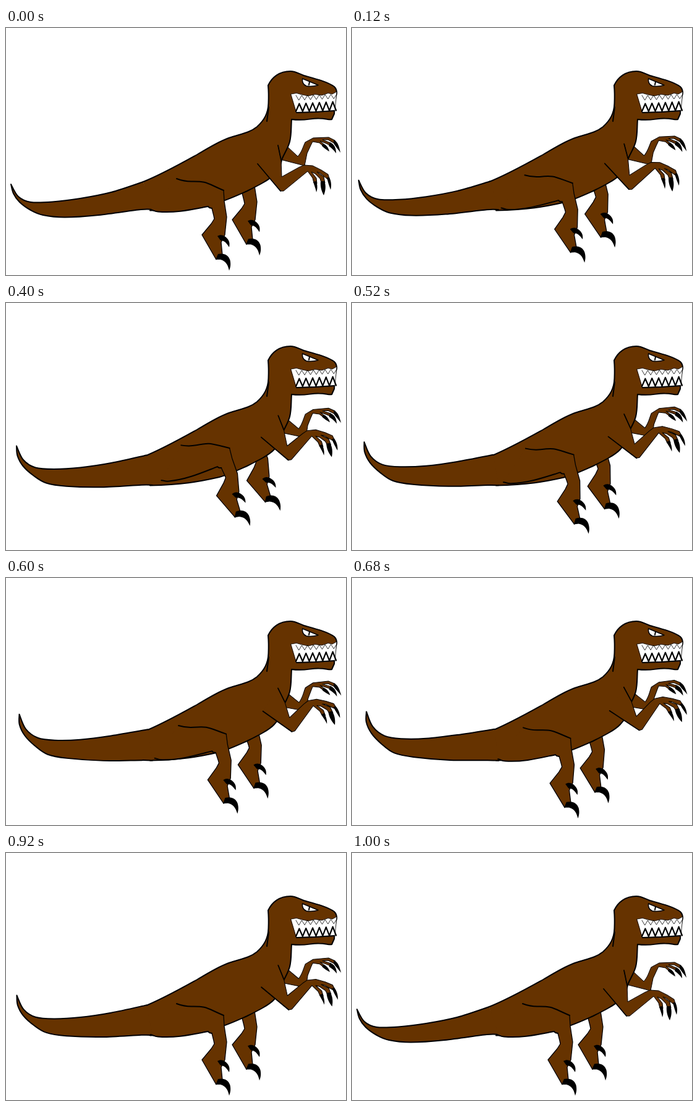
Animation of 550 by 400 pixels, one loop 1.04 s. Source, as an HTML page with a canvas:

```html
<!DOCTYPE html>
<html lang="en">
<head>
<meta charset="utf-8">
<title>Raptor</title>
<style>
html, body { margin: 0; width: 100%; height: 100%; overflow: hidden; background: #fff; }
canvas { display: block; width: 550px; height: 400px; }
</style>
</head>
<body>
<canvas id="stage" width="550" height="400"></canvas>
<script>
const ctx = document.getElementById('stage').getContext('2d');
const BROWN = '#663300';
const STEP = 40, STEPS = 26;

const body = new Path2D(`M222 249 C252 237 282 220 310 204.500 C330 193 345 183 362 177.500
  C378 172 394 170 406 160 C418 149 424 138 424.500 122 C425 110 425 104 424 93
  C430 80 442 70 460 70 C468 70 474 74 482 77 C500 82 520 87 531 95
  C534 98 535 101 535 105 L532 120 L531 139 L527 148 C522 149 518 146.500 506 146.500
  C492 146 484 151 462 148 C461 160 462 172 459 184 C456 196 447 208 446 214
  C445 222 441 230 434 237 C426 246 408 255 390 264 C372 272 358 278.500 345 282
  C310 290 285 294 233 295.500`);
const nape = new Path2D('M425 128 L424 136 L422 151');
const mouth = new Path2D(`M461 107 L470 105.500 L479 108 L489 110 L500 107.500 L511 109 L521 105.500 L528 107 L535 103
  L534 114 L532 134 L500 136 L470 137 Z`);
const eye = new Path2D('M479.500 82 L505 92.500 C500 94 492 95 486 94 C481 92 479 87 479.500 82 Z');
const pupil = new Path2D('M491 87 L490 92');

const thigh = new Path2D('M276 244 C284 247 291 248.500 300 248.500 C325 248 324 251 352 263');
const underThigh = new Path2D('M234 294 C239 295 239 297 246 297.500 C275 300 300 294 327 289 L329 291 L333 292');
const legFill = new Path2D(`M276 244 C284 247 291 248.500 300 248.500 C325 248 324 251 352 263
  L353 280 L357 306 L354 335 L348 347 L350 367 L340 375 L317 335 L332 317 L337 309 L336 304 L333 292
  L329 291 L327 289 C300 294 275 300 246 297.500 C239 297 239 295 234 294 Z`);
const shin = new Path2D(`M352 263 L353 280 L357 306 L354 335 L348 347 L350 367 M340 375 L317 335
  L332 317 L337 309 L336 304 L333 292`);
const toes = new Path2D(`M339 375 L343 366 C353 364 360 368 362.500 376 C364 383 363 388 361 393
  C359 385 357 378 347 375 Z
  M342 337 C348 333 354 336 358 341 C362 346 362 350 361 355 C357 349 354 344 347 344 Z`);

const arm = new Path2D(`M440 190 L445 214 L446 241 L474 225.500 L482 222 L496 223 L510 230 L521 237 L524 247
  L519 244 L508 235 L503 233 L514 241 L516 251 L510 250 L508 244 L500 236 L494 233 L502 243 L503 252 L498 251
  L496 243 L488 232 L449 264 L444 264 L407 220`);
const shoulder = new Path2D('M440 190 L445 214 M407 220 L444 264');
const claws = new Path2D(`M519 242 L523 242 C526 248 527 255 525 262 C523 256 521 251 519 242 Z
  M509 248 L515 248 C518 255 517 264 514 271 C511 265 508 258 509 248 Z
  M497 249 L502 248 C504 254 504 261 502 266 C501 260 499 256 497 249 Z`);

const farArm = new Path2D(`M456 193 L472 208 C479 200 480 193 484 185 L497 178 L522 177 L532 182 L535 189
  L521 181 L512 181 L525 186 L528 192 L518 187 L508 183 L516 190 L515 193 L507 186 L496 184 L493 190
  L487 203 L483 223 L444 213`);
const farClaws = new Path2D(`M530 181 C537 184 539 192 541 202 C537 196 533 192 530 187 Z
  M524 185 C531 188 534 194 534 203 C530 197 526 194 522 191 Z
  M513 187 C518 189 522 194 523 200 C518 197 514 194 511 191 Z`);

// Tail edges, lowered and raised: base to tip above, tip to base below
const topLow = [[222,249],[170,266],[120,276],[75,281.5],[40,282],[20,273],[8,253]];
const topHigh = [[232,244],[170,252],[120,257],[80,256.5],[55,251],[36,235],[26,210]];
const underLow = [[8,253],[12,268],[22,282],[40,295],[60,303],[95,306.5],[150,303],[218,294],[237,294]];
const underHigh = [[26,210],[25,227],[33,246],[49,264],[70,280],[100,287],[160,293.5],[220,295.5],[237,296]];

const mix = (a, b, k) => a.map((p, i) => [p[0] + (b[i][0] - p[0]) * k, p[1] + (b[i][1] - p[1]) * k]);

function spline(path, pts) {
  for (let i = 0; i < pts.length - 1; i++) {
    const a = pts[i], b = pts[i + 1], p = pts[i - 1] || a, n = pts[i + 2] || b;
    path.bezierCurveTo(a[0] + (b[0] - p[0]) / 6, a[1] + (b[1] - p[1]) / 6,
      b[0] - (n[0] - a[0]) / 6, b[1] - (n[1] - a[1]) / 6, b[0], b[1]);
  }
}

function fill(path, color = BROWN) {
  ctx.fillStyle = color;
  ctx.fill(path);
}

function line(path, width = 1) {
  ctx.lineWidth = width;
  ctx.strokeStyle = '#000';
  ctx.stroke(path);
}

// Draws a part turned counter-clockwise about a pivot
function turned(x, y, angle, draw) {
  ctx.save();
  ctx.translate(x, y);
  ctx.rotate(-angle);
  ctx.translate(-x, -y);
  draw();
  ctx.restore();
}

function drawLeg() {
  fill(legFill);
  line(thigh, 2);
  line(underThigh, 2);
  line(shin, 1.3);
  fill(toes, '#000');
}

function drawArm(shape, nails) {
  fill(shape);
  line(shape, 1);
  fill(nails, '#000');
}

function drawTail(k) {
  const top = mix(topLow, topHigh, k), under = mix(underLow, underHigh, k);
  const tail = new Path2D();
  tail.moveTo(...top[0]);
  spline(tail, top);
  spline(tail, under);
  fill(tail);
  line(tail, 2);
}

// Row of teeth; the tips climb by rise per tooth
function teeth(x0, x1, count, root, tip, rise, width) {
  const row = new Path2D(), w = (x1 - x0) / count;
  row.moveTo(x0, root);
  for (let i = 0; i < count; i++) {
    const x = x0 + i * w;
    row.lineTo(x + w * 0.5, tip - i * rise);
    row.lineTo(x + w, root - i * 0.3);
  }
  line(row, width);
}

function drawHead() {
  line(nape, 2);
  fill(mouth, '#fff');
  line(mouth, 0.8);
  line(new Path2D('M470 137 L500 136 L531 134'), 1.8);
  teeth(469, 535, 7, 109, 117, 0.4, 0.8);
  teeth(469, 534, 6, 135, 122.5, 0.6, 2.2);
  fill(eye, '#fff');
  line(eye, 1.5);
  line(pupil, 2);
}

function legLift(n) {
  if (n < 7) return n / 7;
  if (n <= 10) return 1;
  return Math.max(0, (18 - n) / 8);
}

// Arms and tail rise slowly, then drop back
const sway = n => (n <= 21 ? n : Math.max(0, (25 - n) * 21 / 4)) / 20;

function draw(n) {
  const lift = 0.187 * legLift(n), k = sway(n);
  ctx.fillStyle = '#fff';
  ctx.fillRect(0, 0, 550, 400);
  ctx.lineJoin = ctx.lineCap = 'round';

  ctx.save();
  ctx.translate(49, -24.5);
  turned(207, 198, lift, drawLeg);
  ctx.restore();

  turned(387, 178, 0.1 * k, () => drawArm(farArm, farClaws));
  fill(body);
  line(body, 2);
  drawTail(k);
  turned(207, 198, lift, drawLeg);
  drawHead();
  turned(394.7, 184.4, 0.34 * k, () => {
    drawArm(arm, claws);
    line(shoulder, 1.7);
  });
}

const start = performance.now();
function tick() {
  draw(Math.floor((performance.now() - start) / STEP) % STEPS);
  requestAnimationFrame(tick);
}
tick();
</script>
</body>
</html>
```
